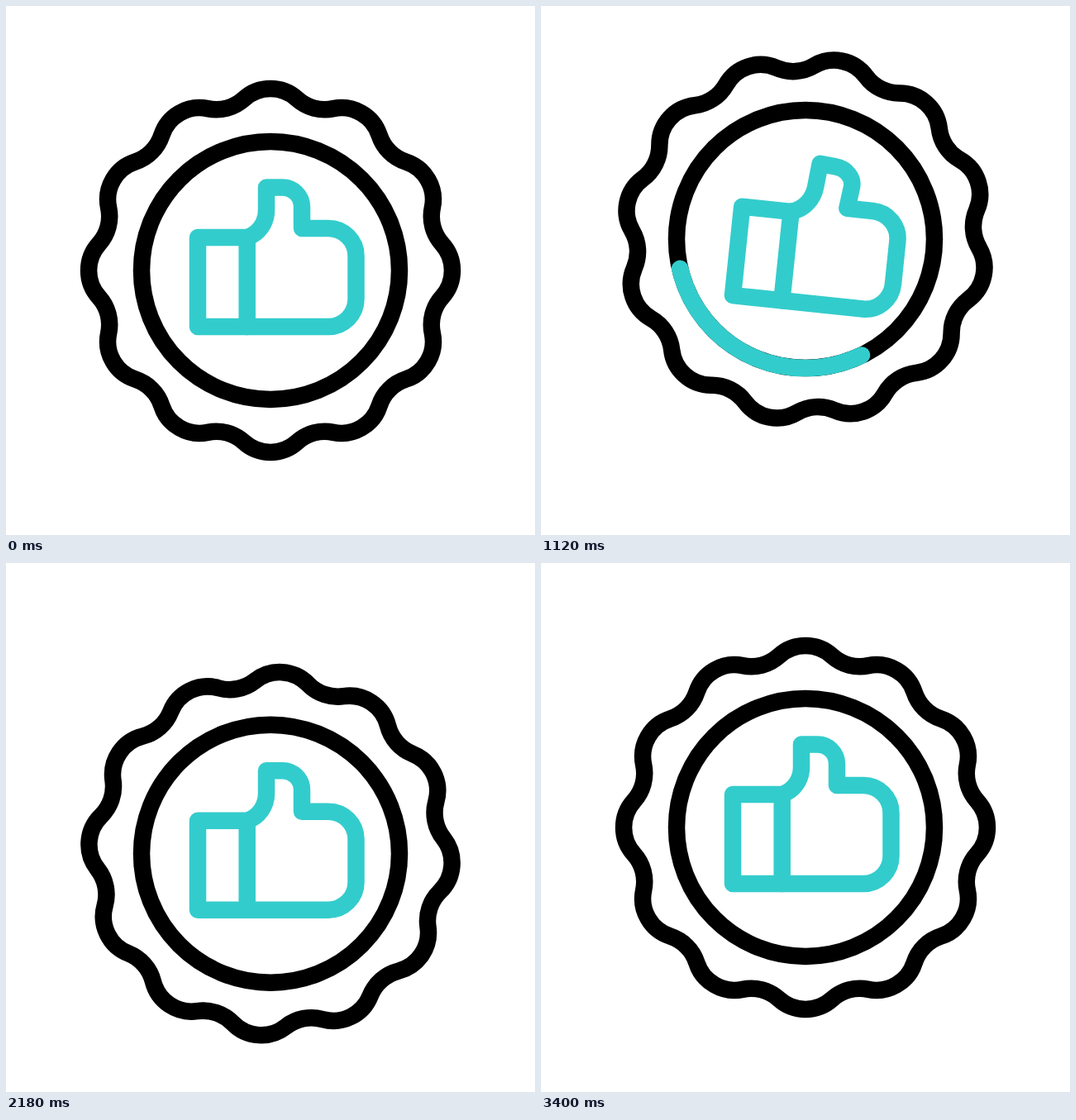
Write an HTML page that moves like this. It is 640x640 px and loops after 3600 ms.

```html
<!DOCTYPE html>
<html lang="en">
<head>
<meta charset="utf-8">
<title>Approval badge</title>
<style>
  html, body { margin: 0; width: 100%; height: 100%; overflow: hidden; background: #fff; }
  svg { display: block; width: 100vw; height: 100vh; }
  path, circle { fill: none; stroke-width: 20.5; stroke-linecap: round; stroke-linejoin: round; }
  .ink { stroke: #000; }
  .teal { stroke: #33cccc; }
</style>
</head>
<body>
<svg viewBox="0 0 640 640">
  <g id="badge">
    <path id="rim" class="ink"/>
    <circle class="ink" cx="320" cy="320" r="156"/>
    <path id="sweepA" class="teal"/>
    <path id="sweepB" class="teal"/>
    <g id="hand">
      <path id="fist" class="teal"/>
      <path class="teal" d="M291.7 280V388"/>
    </g>
  </g>
</svg>
<script>
const LOOP = 3600;
const $ = id => document.getElementById(id);
const [badge, rim, sweepA, sweepB, hand, fist] =
  ['badge', 'rim', 'sweepA', 'sweepB', 'hand', 'fist'].map($);

// Tracks: [time, value, optional x of the second easing handle]
const LIFT = [[0, 0], [1200, -38.4], [2400, 38.4], [3400, 0, 0.56]];
const SPIN = [[0, 0], [3200, 360]];
const TILT = [[0, 0], [533, -10], [1067, 6], [2133, 0]];
const BEND = [[0, 0], [533, 1], [1067, -0.35], [2133, 0]];
const SWEEPS = [
  { el: sweepA, tail: [[310, 0], [1010, 1]], head: [[0, 0], [1010, 1]] },
  { el: sweepB, tail: [[800, 0], [2133, 1]], head: [[667, 0], [1667, 1]] }
];

// Cubic Bezier easing with handles (1/3, 0) and (x2, 1)
function ease(x, x2 = 2 / 3) {
  let lo = 0, hi = 1;
  for (let i = 0; i < 24; i++) {
    const s = (lo + hi) / 2, r = 1 - s;
    if (s * r * r + 3 * x2 * s * s * r + s * s * s < x) lo = s;
    else hi = s;
  }
  return lo * lo * (3 - 2 * lo);
}

function at(track, t) {
  if (t <= track[0][0]) return track[0][1];
  for (let i = 1; i < track.length; i++) {
    const [t0, v0] = track[i - 1], [t1, v1, x2] = track[i];
    if (t < t1) return v0 + (v1 - v0) * ease((t - t0) / (t1 - t0), x2);
  }
  return track[track.length - 1][1];
}

// Point at a clockwise angle from the top of the badge
function polar(r, deg, spin = 0) {
  const a = (deg + spin) * Math.PI / 180;
  return `${(320 + r * Math.sin(a)).toFixed(3)} ${(320 - r * Math.cos(a)).toFixed(3)}`;
}

function scallops(count) {
  const step = 360 / count, half = 8.79, r = 210.1;
  let d = `M${polar(r, -half)}`;
  for (let i = 0; i < count; i++) {
    d += `A48 48 0 0 1 ${polar(r, i * step + half)}`;
    d += `A50 50 0 0 0 ${polar(r, (i + 1) * step - half)}`;
  }
  return d + 'Z';
}

function sweep(tail, head, spin) {
  if (head - tail < 0.001) return '';
  const from = tail * 360, to = head * 360;
  const large = to - from > 180 ? 1 : 0;
  return `M${polar(156, from, spin)}A156 156 0 ${large} 1 ${polar(156, Math.min(to, from + 359.9), spin)}`;
}

// Fist outline; b leans the thumb to the left
function fistPath(b) {
  const p = (x, y, dx, dy) => `${x + dx * b} ${y + dy * b} `;
  return 'M291.7 280' +
    'C' + p(306, 275.5, -3, 0.5) + p(315, 262, -6, 0) + p(315, 247, -9, 2) +
    'L' + p(315, 219.5, -16, 2.5) +
    'L' + p(334.5, 219.5, -15, -2) +
    'C' + p(347.5, 219.5, -13, -5) + p(358, 230, -14, -2) + p(358, 243, -10.5, 0) +
    'L' + p(358, 269, -2, 0.5) +
    'H390A33.5 33.5 0 0 1 423.5 302.5V354.5A33.5 33.5 0 0 1 390 388H232V280Z';
}

function render(t) {
  const spin = at(SPIN, t);
  badge.setAttribute('transform', `translate(0 ${at(LIFT, t)})`);
  rim.setAttribute('transform', `rotate(${spin} 320 320)`);
  hand.setAttribute('transform', `rotate(${at(TILT, t)} 232 388)`);
  fist.setAttribute('d', fistPath(at(BEND, t)));
  for (const { el, tail, head } of SWEEPS) {
    el.setAttribute('d', sweep(at(tail, t), at(head, t), spin));
  }
}

rim.setAttribute('d', scallops(12));
render(0);
const start = performance.now();
(function tick() {
  render((performance.now() - start) % LOOP);
  requestAnimationFrame(tick);
})();
</script>
</body>
</html>
```
